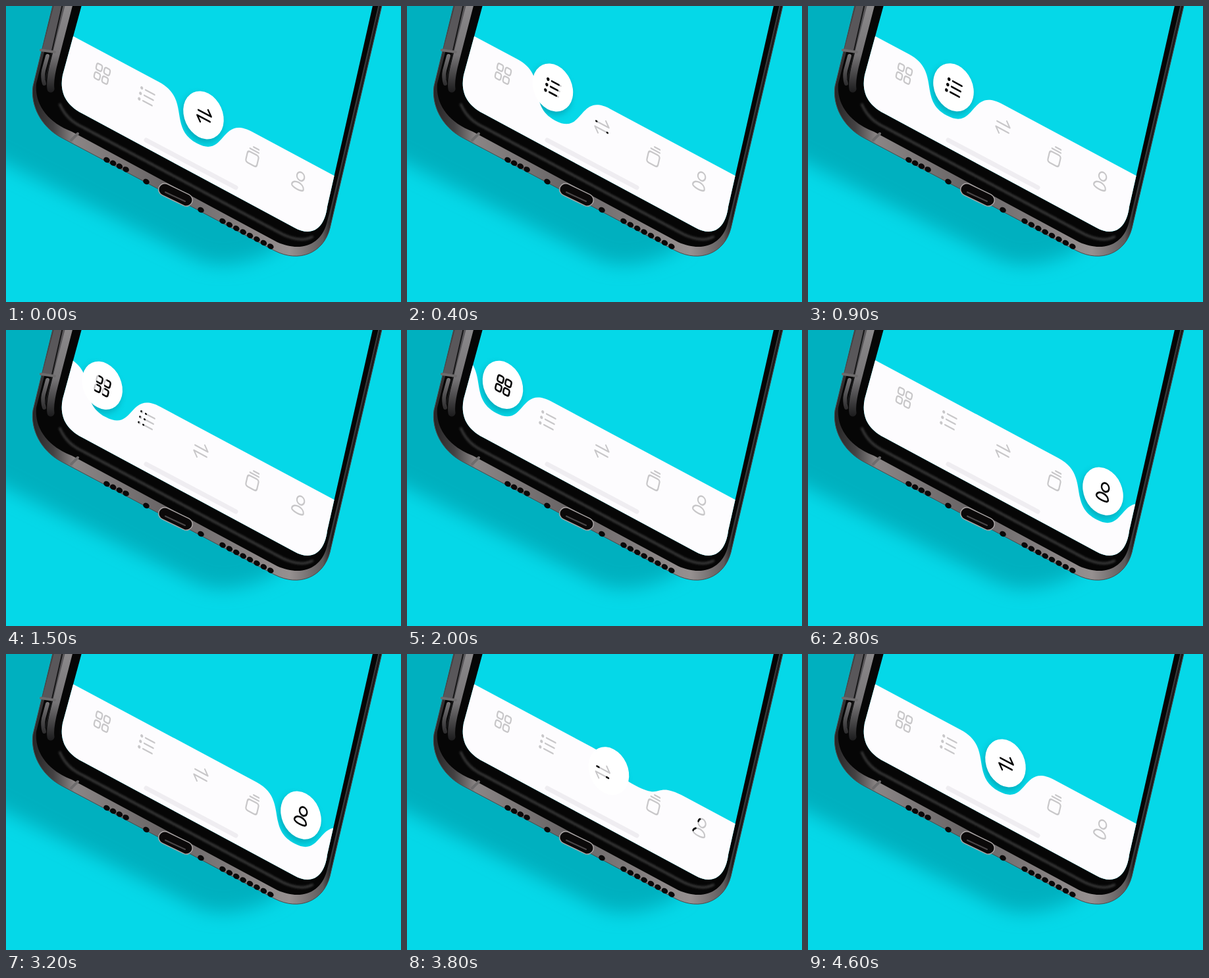
An HTML page for the animation above (4700 ms loop, 600 by 450 pixels).

```html
<!DOCTYPE html>
<html lang="en">
<head>
<meta charset="utf-8">
<title>Tab bar</title>
<style>
  html, body { margin: 0; width: 100%; height: 100%; overflow: hidden; background: #05d8e8; }
  svg { display: block; width: 600px; height: 450px; }
  path, line { stroke-linecap: round; stroke-linejoin: round; }
</style>
</head>
<body>
<svg viewBox="0 0 600 450">
  <defs>
    <filter id="wide" x="-30%" y="-30%" width="160%" height="160%"><feGaussianBlur stdDeviation="14"/></filter>
    <filter id="soft" x="-30%" y="-30%" width="160%" height="160%"><feGaussianBlur stdDeviation="4"/></filter>
    <filter id="fine" x="-30%" y="-30%" width="160%" height="160%"><feGaussianBlur stdDeviation="1.5"/></filter>
    <linearGradient id="metal" gradientUnits="userSpaceOnUse" x1="40" y1="0" x2="495" y2="0">
      <stop offset="0" stop-color="#252425"/>
      <stop offset=".07" stop-color="#444243"/>
      <stop offset=".14" stop-color="#8a8585"/>
      <stop offset=".45" stop-color="#686465"/>
      <stop offset=".86" stop-color="#969090"/>
      <stop offset=".97" stop-color="#5e5b5c"/>
      <stop offset="1" stop-color="#1c1c1d"/>
    </linearGradient>
    <linearGradient id="band" gradientUnits="userSpaceOnUse" x1="0" y1="0" x2="0" y2="135">
      <stop offset="0" stop-color="#8b898b"/>
      <stop offset=".55" stop-color="#767476"/>
      <stop offset="1" stop-color="#161617"/>
    </linearGradient>
    <clipPath id="screen">
      <path d="M116-5L86 105C81 130 90 150 115 163L438 337C465 352 484 338 488 305L558-5Z"/>
    </clipPath>
  </defs>

  <rect width="600" height="450" fill="#05d8e8"/>
  <path d="M-60-60H120L420 365Q340 410 285 383L-60 210Z" fill="#04b0bf" filter="url(#wide)"/>

  <!-- phone body -->
  <path d="M72-5L41 122C37 150 52 183 84 200L408 372C445 391 482 376 492 338L572-5Z" fill="url(#metal)" stroke="#4b494a"/>
  <path d="M77-5L46 118C43 149 63 177 100 191L412 359C448 375 478 363 487 331L569-5Z" fill="#060606"/>
  <path d="M74-5H92L73 68L55 66Z" fill="#59575a"/>
  <path d="M96-3L74 82Q66 112 68 126" fill="none" stroke="url(#band)" stroke-width="11"/>
  <path d="M63 76L57 98Q55 108 58 118" fill="none" stroke="url(#band)" stroke-width="6"/>
  <path d="M86-3L60 112" stroke="#171718" stroke-width="2"/>
  <path d="M53 67L74 70M99 204L109 194" stroke="#6e6c6d" stroke-width="4" fill="none"/>
  <path d="M82 150Q92 173 116 184L420 347Q448 360 465 351" fill="none" stroke="#343434" stroke-width="4" filter="url(#fine)"/>
  <path d="M567-3L490 326" stroke="#3b3b3c" stroke-width="2"/>
  <g id="holes" fill="#0a0909"></g>
  <path d="M241 279L274 295" stroke="#aaa5a5" stroke-width="20"/>
  <path d="M241 279L274 295" stroke="#0b0909" stroke-width="17"/>
  <path d="M242 283L272 297" stroke="#4b4748" stroke-width="2"/>

  <g clip-path="url(#screen)">
    <rect width="600" height="450" fill="#05d8e8"/>
    <circle id="shade" r="34" fill="#0397a8" opacity=".65" filter="url(#soft)"/>
    <path id="bar" fill="#fdfcfe"/>
    <path id="skirt" fill="#fdfcfe"/>
    <path d="M213 204L349 276" stroke="#efedf1" stroke-width="7"/>
    <circle id="ball" r="33.8" fill="#fff"/>
    <g id="icons" fill="none"></g>
  </g>
</svg>
<script>
const $ = id => document.getElementById(id);
const LOOP = 4700, STEP = 100, EDGE = -13;
const slotX = [145.5, 221, 300, 375, 448];
const homes = [[146, 103], [214, 138], [296, 184], [375, 228], [445, 266]];
// start time, slot left, slot entered
const moves = [[0, 2, 1], [1110, 1, 0], [2190, 0, 4], [3450, 4, 2]];

const add = (parent, name, attrs) => {
  const el = document.createElementNS('http://www.w3.org/2000/svg', name);
  for (const k in attrs) el.setAttribute(k, attrs[k]);
  return parent.appendChild(el);
};
const ring = (x, y, r) => `M${x - r} ${y}a${r} ${r} 0 1 1 ${2 * r} 0a${r} ${r} 0 1 1 ${-2 * r} 0`;
const box = (x, y, w, h, r) =>
  `M${x + r} ${y}h${w - 2 * r}q${r} 0 ${r} ${r}v${h - 2 * r}q0 ${r} ${-r} ${r}` +
  `h${2 * r - w}q${-r} 0 ${-r} ${-r}v${2 * r - h}q0 ${-r} ${r} ${-r}`;

const shapes = [
  [[-11.5, -11.5], [2, -11.5], [-11.5, 2], [2, 2]].map(([x, y]) => box(x, y, 9.5, 9.5, 3)),
  [-8.5, 0, 8.5].flatMap(y => [ring(-11, y, 1.2), `M-4.5 ${y}H11`]),
  ['M-11-4H11L4-11', 'M11 4H-11L-4 11'],
  [box(-9.5, -4, 19, 17, 4), 'M-7-8.5H8', 'M-2-13H7'],
  [ring(1, -7.5, 6.2), 'M-10 9C-9 0 9 0 10 9C10 14-10 14-10 9Z']
];
const icons = shapes.map(list => {
  const g = add($('icons'), 'g', {});
  list.forEach(d => add(g, 'path', { d, stroke: '#c8c7c9', 'stroke-width': 2.3 }));
  const ink = list.map(d => add(g, 'path', { d, stroke: '#050505', 'stroke-width': 2.6, pathLength: 1 }));
  return { g, ink };
});

const hole = (x, y, r) => add($('holes'), 'ellipse', { rx: r + 1, ry: r, transform: `translate(${x} ${y}) rotate(28)` });
for (let i = 0; i < 4; i++) hole(153 + i * 9.7, 234 + i * 4.8, 4);
for (let i = 0; i < 8; i++) hole(329 + i * 10.4, 327 + i * 5.5, 4);
hole(213, 267, 4);
hole(296, 310, 4);

const mix = (a, b, k) => a + (b - a) * k;
const clamp = k => Math.max(0, Math.min(1, k));
const smooth = (p, a, b) => { const k = clamp((p - a) / (b - a)); return k * k * (3 - 2 * k); };
const cubic = k => { k = clamp(k); return k < .5 ? 4 * k ** 3 : 1 - 4 * (1 - k) ** 3; };
const railY = x => 166 + (x - 300) * .535;
const tilt = (x, y) => `matrix(.882 .472 -.228 .974 ${x} ${y})`;
const place = (el, x, y) => el.setAttribute('transform', tilt(x, y));

function draw(t) {
  const [start, from, to] = moves.filter(m => m[0] <= t).pop();
  const p = t - start;
  const ballX = mix(slotX[from], slotX[to], cubic(p / 450));
  const notchX = mix(slotX[from], slotX[to], cubic(p / 620));
  const depth = 1 - smooth(p, 0, 170) * (1 - smooth(p, 315, 400));
  const rise = smooth(p, 120, 200) * (1 - smooth(p, 230, 330));
  const sink = 9 * smooth(p, 200, 300) * (1 - smooth(p, 340, 400));
  const ballY = railY(ballX);

  const low = EDGE + 57 * depth;
  $('bar').setAttribute('d', `M-700 ${EDGE}H-80C-25 ${EDGE}-50 ${low} 0 ${low}S25 ${EDGE} 80 ${EDGE}H700V500H-700Z`);
  place($('bar'), notchX, railY(notchX));
  const top = EDGE - 23 * rise;
  $('skirt').setAttribute('d', `M-72 ${EDGE}C-38 ${EDGE}-28 ${top} 0 ${top}S38 ${EDGE} 72 ${EDGE}Z`);
  place($('skirt'), ballX, ballY);

  place($('ball'), ballX, ballY + sink);
  place($('shade'), ballX - 2, ballY + sink + 5);
  $('shade').setAttribute('opacity', .65 * depth);

  icons.forEach(({ g, ink }, i) => {
    let lift = 0, trim = 0;
    if (i === from) {
      lift = 1 - smooth(p, 60, 420);
      trim = 1 - smooth(p, 0, 450);
    } else if (i === to) {
      lift = smooth(p, 325, 400);
      trim = smooth(p, 330, 430);
    }
    const [x, y] = homes[i];
    place(g, mix(x, slotX[i] + 1, lift), mix(y, railY(slotX[i]) + 1, lift));
    ink.forEach(el => {
      el.setAttribute('stroke-dasharray', trim < 1 ? `${trim} 2` : 'none');
      el.setAttribute('opacity', trim > .02 ? 1 : 0);
    });
  });
}

const origin = performance.now();
function tick() {
  const t = (performance.now() - origin) % LOOP;
  draw(Math.floor(t / STEP) * STEP);
  requestAnimationFrame(tick);
}
tick();
</script>
</body>
</html>
```
